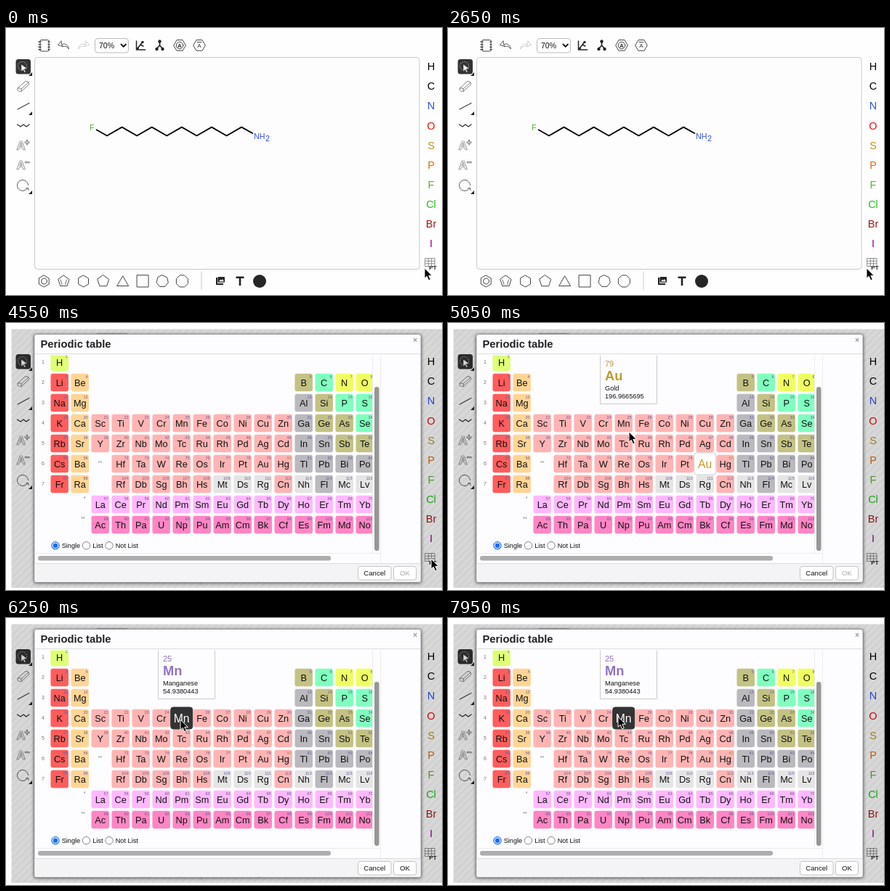
These frames come from a looping animation (600 by 368 pixels, 8000 ms). An HTML page:

```html
<!DOCTYPE html>
<html lang="en">
<head>
<meta charset="utf-8">
<title>Structure editor</title>
<style>
html, body { margin: 0; width: 100%; height: 100%; overflow: hidden; background: #fefefe; }
svg { display: block; width: 600px; height: 368px; font-family: "Liberation Sans", Arial, sans-serif; }
.icon { fill: none; stroke: #444; stroke-width: 1; stroke-linejoin: round; stroke-linecap: round; }
.mid { text-anchor: middle; }
</style>
</head>
<body>
<svg id="stage" viewBox="0 0 600 368">
  <defs>
    <clipPath id="view"><rect x="41" y="44.5" width="463" height="286"/></clipPath>
    <filter id="soft" x="-10%" y="-10%" width="120%" height="120%"><feGaussianBlur stdDeviation="2.2"/></filter>
    <pattern id="hatch" width="7" height="7" patternUnits="userSpaceOnUse" patternTransform="rotate(45)">
      <rect width="7" height="7" fill-opacity=".15"/>
      <rect width="3.500" height="7" fill-opacity=".03"/>
    </pattern>
  </defs>
  <g id="page">
    <rect x="39.5" y="40.5" width="529.5" height="292" rx="4" fill="#fdfdfe" stroke="#c9c9c9"/>
    <g class="icon">
      <rect x="47" y="16.5" width="12" height="15.5" rx="1.5"/>
      <path d="M45 19h3m-3 3.6h3m-3 3.6h3m-3 3.6h3M58 19h2m-2 3.6h2m-2 3.6h2m-2 3.6h2" stroke-width="1.4"/>
      <path d="M76 18l-4.500 5.500 7 2-2-2.500c4-2.500 9-.5 10 6-3-4-6-4.500-9-3.200M76 18l.5 4" stroke="#555"/>
      <path d="M110 18l4.500 5.500-7 2 2-2.500c-4-2.500-9-.5-10 6 3-4 6-4.500 9-3.200M110 18l-.5 4" stroke="#ccc"/>
      <rect x="122.500" y="14.500" width="46" height="19.500" rx="3.500" fill="#fff" stroke="#bbb"/>
      <path d="M158.500 22.500l3.200 3.300 3.200-3.300" stroke="#111" stroke-width="1.800"/>
      <path d="M179.500 18v12h12M181 28l4-5 4 2M185 23l3-4" stroke="#222" stroke-width="1.500"/>
      <path d="M211.500 18v6l-4.500 5m4.500-5l4.500 5" stroke="#222" stroke-width="1.700"/>
      <path d="M16 112l16-8.500" stroke="#444" stroke-width="1.200"/>
      <path d="M15.500 133l4.500 3 4-3 4 3 4-3" stroke="#333" stroke-width="1.300"/>
      <path d="M16 83l10-9q2-1 4 0t1.500 4l-10 9q-2 1-4 0t-1.500-4q3-1 5 1l.500 3.500M21 84l10-9" stroke="#777" stroke-width=".9"/>
      <path d="M29 221.500a7.500 7.500 0 1 1 1.500-5m-3 4.500l3-.500 .500 3" stroke="#555"/>
      <path d="M577 317.500h13v11h-13zM577 321.200h13m-13 3.600h13M581.300 317.500v11m4.300-11v11" stroke="#777" stroke-width=".8"/>
      <path d="M269 336v25" stroke="#ccc"/>
      <circle cx="52.500" cy="349" r="4"/>
      <path d="M75 347l2 6.500m4.500 0l2-6.500" stroke-width=".8"/>
    </g>
    <g fill="#222">
      <circle cx="211.500" cy="18.500" r="2.200"/><circle cx="207.500" cy="29" r="2.200"/><circle cx="215.500" cy="29" r="2.200"/>
      <circle cx="188" cy="19.500" r="1.700"/><circle cx="181.500" cy="28" r="1.500"/>
      <rect x="13.500" y="43" width="20.500" height="20.500" rx="3.500" fill="#333"/>
      <path d="M31 66h5v-5zM31 120h5v-5zM31 229h5v-5z"/>
      <path d="M289 344h2v8h8v2h-10z"/><rect x="291.500" y="343" width="9.500" height="7.800" rx="1"/>
      <path d="M293 349.500l2-3 1.500 1.500 1.500-2 2 3.500z" fill="#fff"/>
      <path d="M316.500 342.500h11v2.500h-4.200v10h-2.600v-10h-4.200z"/>
      <circle cx="349" cy="349" r="9" fill="#262626"/>
    </g>
    <circle cx="22.500" cy="52.500" r="6" fill="none" stroke="#aaa" stroke-width=".9" stroke-dasharray="2 1"/>
    <path d="M21 50l8 6-4 .5 2 4-1.500.7-2-4-2.500 2.500z" fill="#fff" stroke="#333" stroke-width=".5"/>
    <path id="chain" fill="none" stroke="#000" stroke-width="1.800" stroke-linejoin="round"/>
  </g>
  <g id="dialog">
    <rect x="7.500" y="8.500" width="593" height="356.500" fill="url(#hatch)"/>
    <rect x="38.500" y="16" width="533" height="342.500" rx="3" fill="#000" fill-opacity=".65" filter="url(#soft)"/>
    <rect x="39" y="15.500" width="532" height="342" rx="3" fill="#fdfcfe" stroke="#8a8a8a" stroke-width=".7"/>
    <path d="M39.500 331.500h531v23q0 2.500-2.500 2.500h-526q-2.500 0-2.500-2.500z" fill="#f4f3f5"/>
    <path d="M39.500 42.500h531M39.500 331.500h531" stroke="#ddd"/>
    <path d="M504.500 44v274M515.500 44v287M41 317.500h474" stroke="#ececec"/>
    <rect x="507" y="88" width="6.500" height="226" rx="3.200" fill="#969696"/>
    <rect x="44" y="321" width="403" height="6.500" rx="3.200" fill="#adadad"/>
    <g id="cells" clip-path="url(#view)"></g>
    <g id="radios"></g>
    <g id="buttons"></g>
    <g id="popup"></g>
    <g id="hover"></g>
  </g>
  <path id="cursor" d="M0 0V14.200L3.200 11.200 5.700 16.800 8.200 15.700 5.800 10.300H10.300Z" fill="#000" stroke="#fff" stroke-width="1"/>
</svg>
<script>
const $ = id => document.getElementById(id);
function add(parent, tag, attrs, text) {
  const el = document.createElementNS('http://www.w3.org/2000/svg', tag);
  for (const k in attrs) el.setAttribute(k, attrs[k]);
  if (text !== undefined) el.textContent = text;
  parent.appendChild(el);
  return el;
}
const label = (parent, x, y, size, text, fill = '#111', more = {}) =>
  add(parent, 'text', { x, y, 'font-size': size, fill, ...more }, text);
const MID = { class: 'mid' }, BOLD = { 'font-weight': 'bold' };

// Page
const page = $('page');
function polygon(cx, cy, r, n, turn = 0) {
  const pts = Array.from({ length: n }, (_, i) => {
    const a = 2 * Math.PI * i / n - Math.PI / 2 + turn;
    return (cx + r * Math.cos(a)).toFixed(2) + ',' + (cy + r * Math.sin(a)).toFixed(2);
  });
  add(page, 'polygon', { points: pts.join(' '), class: 'icon' });
}
[[6, 8], [5, 8], [6, 8], [5, 8.3], [3, 9], [4, 11.3], [7, 8.3], [8, 8.6]].forEach(([n, r], i) =>
  polygon(52.3 + 27.15 * i, n === 3 ? 351 : 349, r, n, n % 4 ? 0 : Math.PI / n));
[239, 266].forEach((x, i) => {
  polygon(x, 24, 8.3, 6, Math.PI / 6);
  label(page, x, 27, 8, 'A', '#333', { class: 'mid', 'font-weight': i ? 'normal' : 'bold' });
});
add(page, 'circle', { cx: 239, cy: 24, r: 4.8, class: 'icon', 'stroke-width': .7 });
add(page, 'path', { d: 'M263 19.500h6', class: 'icon' });
label(page, 128, 28, 10.5, '70%');
const OUTLINE = { ...BOLD, stroke: '#666', 'stroke-width': .7 };
['+', '−'].forEach((s, i) => {
  label(page, 14.5, 168 + 27 * i, 17, 'A', '#fff', OUTLINE);
  label(page, 25.5, 162 + 27 * i, 12, s, '#fff', OUTLINE);
});
Object.entries({ H: '#000', C: '#000', N: '#304ff7', O: '#f00d0d', S: '#b8961c', P: '#e06a10',
  F: '#5fb030', Cl: '#1fc01f', Br: '#a01818', I: '#940094' }).forEach(([s, c], i) =>
  label(page, 585, 58.2 + 27.1 * i, 14.5, s, c, MID));
label(page, 582.3, 332.5, 8, 'PT', '#222', BOLD);
let d = 'M124 140';
for (let i = 0; i < 10; i++) d += `L${139 + 20.57 * i} ${i % 2 ? 136.6 : 148.5}`;
$('chain').setAttribute('d', d + 'L340 145.500');
label(page, 115, 141, 11, 'F', '#5fb030');
label(page, 341, 152.5, 10.7, 'NH', '#304fd7');
label(page, 357, 155.5, 10.7, '2', '#304fd7');

// Periodic table
const FILL = { a: '#ff5d5d', e: '#ffd596', t: '#ffb4b4', p: '#b9b9be', m: '#c3c284', n: '#80ffbf',
  g: '#efff62', h: '#dfff74', u: '#e5e5e5', l: '#ffb8ff', c: '#ff85c5' };
// row, first column, first atomic number, symbols, group letters
const BLOCKS = [
  [0, 0, 1, 'H', 'h'],
  [1, 0, 3, 'Li Be', 'ae'], [1, 12, 5, 'B C N O', 'mngg'],
  [2, 0, 11, 'Na Mg', 'ae'], [2, 12, 13, 'Al Si P S', 'pmnn'],
  [3, 0, 19, 'K Ca Sc Ti V Cr Mn Fe Co Ni Cu Zn Ga Ge As Se', 'aettttttttttpmmn'],
  [4, 0, 37, 'Rb Sr Y Zr Nb Mo Tc Ru Rh Pd Ag Cd In Sn Sb Te', 'aettttttttttppmm'],
  [5, 0, 55, 'Cs Ba', 'ae'], [5, 3, 72, 'Hf Ta W Re Os Ir Pt Au Hg Tl Pb Bi Po', 'tttttttttpppp'],
  [6, 0, 87, 'Fr Ra', 'ae'], [6, 3, 104, 'Rf Db Sg Bh Hs Mt Ds Rg Cn Nh Fl Mc Lv', 'tttttuuutupuu'],
  [7, 2, 57, 'La Ce Pr Nd Pm Sm Eu Gd Tb Dy Ho Er Tm Yb', 'l'.repeat(14)],
  [8, 2, 89, 'Ac Th Pa U Np Pu Am Cm Bk Cf Es Fm Md No', 'c'.repeat(14)]
];
const SIZE = 24.5, cells = $('cells'), at = {};
for (const [row, col, z, names, groups] of BLOCKS) {
  names.split(' ').forEach((s, i) => {
    const x = 73.7 + 28 * (col + i), y = 54 + 28 * row;
    const box = add(cells, 'rect', { x: x - SIZE / 2, y: y - SIZE / 2, width: SIZE, height: SIZE, rx: 3, fill: FILL[groups[i]] });
    const num = label(cells, x + 10.8, y - 6.4, 5.5, z + i, s === 'Hg' ? '#b58a3c' : '#6d5590', { 'text-anchor': 'end' });
    const sym = label(cells, x, y + 4.6, 12.7, s, '#111', MID);
    at[s] = { x, y, z: z + i, box, num, sym };
  });
}
for (let i = 1; i < 8; i++) label(cells, 51, 27.7 + 28 * i, 7, i, '#777', MID);
[[129.5, 195, '**'], [108, 244, '*'], [106, 272, '**']].forEach(([x, y, s]) => label(cells, x, y, 7, s, '#777', MID));

const dialog = $('dialog');
label(dialog, 47.5, 34, 14.8, 'Periodic table', '#222', BOLD);
label(dialog, 563, 27, 10.5, '×', '#999', { class: 'mid', 'font-weight': 'bold' });
[[68, 'Single'], [110.5, 'List'], [142, 'Not List']].forEach(([x, s], i) => {
  add($('radios'), 'circle', { cx: x, cy: 306.7, r: 5.2, fill: i ? '#fff' : '#1a6ce8', stroke: i ? '#777' : '#1a6ce8', 'stroke-width': .9 });
  if (!i) add($('radios'), 'circle', { cx: x, cy: 306.7, r: 3.8, fill: 'none', stroke: '#fff', 'stroke-width': 1.2 });
  label($('radios'), x + 8.7, 310.2, 9.2, s);
});
function button(x, w, text) {
  add($('buttons'), 'rect', { x, y: 335.5, width: w, height: 18.5, rx: 3, fill: '#fff', stroke: '#c4c4c4' });
  return label($('buttons'), x + w / 2, 348.2, 9.6, text, '#111', MID);
}
button(484.5, 45.5, 'Cancel');
const ok = button(533.5, 31, 'OK');

const popup = $('popup'), hover = $('hover');
add(popup, 'path', { d: 'M209.500 44.500V111.500H287.500V44.500', fill: '#fdfcfe', stroke: '#ccc' });
const info = [[60, 11, {}], [79, 18.3, BOLD], [92.5, 9.2, {}], [103.7, 9.2, {}]]
  .map(([y, size, more]) => label(popup, 216, y, size, '', '#111', more));
const bigBox = add(hover, 'rect', { width: 30, height: 30, rx: 3.5 });
const bigSym = label(hover, 0, 0, 15.7, '', '#111', MID);
const ATOMS = {
  Au: ['Gold', '196.9665695', '#c29a2c'],
  Mn: ['Manganese', '54.9380443', '#9273c0'],
  Rh: ['Rhodium', '102.905502', '#257a87']
};

// Timeline
const LOOP = 8000, OPEN = 4550, PICK = 5850;
const PATH = [[0, 576, 331], [3850, 576, 331], [3900, 580, 324], [4300, 585, 325], [4600, 585, 325],
  [5050, 249, 150], [5200, 241, 140], [6250, 240, 140], [6400, 240, 140], [6750, 515, 320],
  [6850, 515, 320], [7100, 230, 119], [7300, 234, 136], [LOOP, 234, 136]];
const HOVER = [[0, ''], [5000, 'Au'], [5100, 'Mn'], [6500, 'Rh'], [6600, ''], [7050, 'Rh'], [7150, 'Mn']];

function cursorAt(t) {
  const i = PATH.findIndex(k => k[0] > t), [t0, x0, y0] = PATH[i - 1], [t1, x1, y1] = PATH[i];
  const p = (t - t0) / (t1 - t0), e = p * p * (3 - 2 * p);
  return [x0 + (x1 - x0) * e, y0 + (y1 - y0) * e];
}
const set = (el, attrs) => { for (const k in attrs) el.setAttribute(k, attrs[k]); };
const show = (el, on) => el.setAttribute('visibility', on ? 'visible' : 'hidden');

function draw(t) {
  const [cx, cy] = cursorAt(t);
  set($('cursor'), { transform: `translate(${cx} ${cy})` });
  const open = t >= OPEN, picked = t >= PICK, mn = at.Mn;
  dialog.setAttribute('display', open ? 'inline' : 'none');
  set(ok, { fill: picked ? '#111' : '#aaa' });
  set(mn.box, { fill: picked ? '#333' : FILL.t });
  set(mn.sym, { fill: picked ? '#fff' : '#111' });
  show(mn.num, !picked);
  const name = HOVER.filter(k => k[0] <= t).pop()[1];
  show(popup, name);
  show(hover, name);
  if (!name) return;
  const { x, y, z } = at[name], [full, mass, color] = ATOMS[name];
  const dark = picked && name === 'Mn';
  [z, name, full, mass].forEach((s, i) => {
    info[i].textContent = s;
    set(info[i], { fill: i < 2 ? color : '#111' });
  });
  set(bigBox, { x: x - 15, y: y - 15, fill: dark ? '#333' : '#fff', stroke: dark ? '#333' : '#ccc' });
  set(bigSym, { x, y: y + 5.8, fill: dark ? '#fff' : color });
  bigSym.textContent = name;
}
const start = performance.now();
function tick() {
  const t = Math.max(0, performance.now() - start) % LOOP;
  draw(Math.floor(t / 50) * 50);
  requestAnimationFrame(tick);
}
draw(0);
tick();
</script>
</body>
</html>
```
